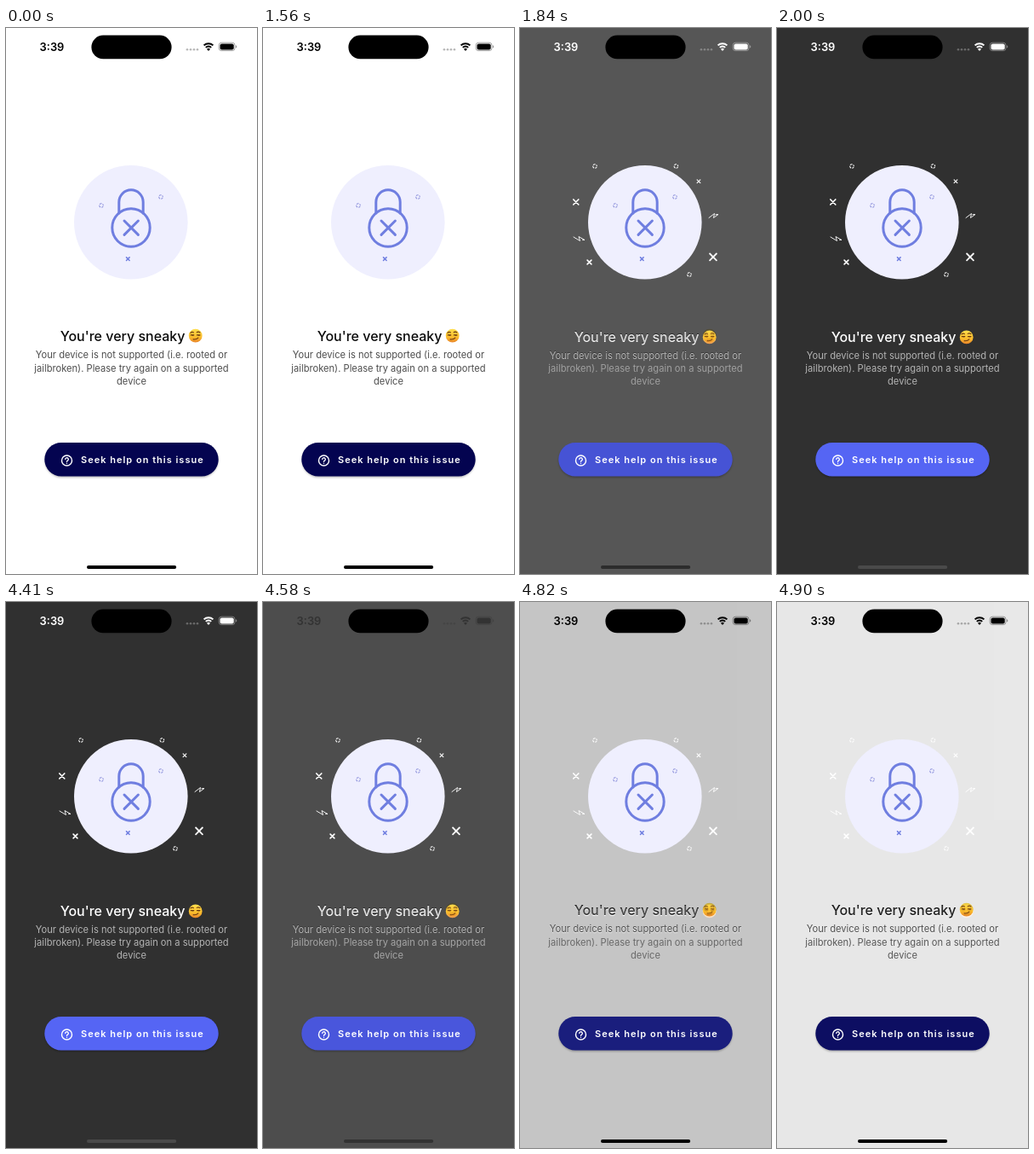
An HTML page that plays this animation: 295x640 px, repeating every 4940 ms.

```html
<!DOCTYPE html>
<html lang="en">
<head>
<meta charset="utf-8">
<style>
html, body { margin: 0; width: 100%; height: 100%; overflow: hidden; background: #fff; }
svg { display: block; width: 100vw; height: 100vh; }
text { font-family: Inter, "Open Sans", sans-serif; }
.title { font-size: 16px; font-weight: 500; }
.body { font-size: 11.15px; text-anchor: middle; }
.btn { font-size: 11px; font-weight: 600; letter-spacing: 1px; fill: #fff; }
.clock { font-size: 12.9px; font-weight: 600; }
.line { fill: none; stroke-linecap: round; stroke-linejoin: round; }
</style>
</head>
<body>
<svg id="stage" viewBox="0 0 295 640"></svg>
<script>
const LOOP = 4940;
const STEPS = [0, 1560, 1630, 1700, 1770, 1840, 1930, 2000, 4410, 4500, 4580, 4660, 4740, 4820, 4900];

const cross = (x, y, r, w, c) =>
  `<path class="line" stroke="${c}" stroke-width="${w}" d="M${x - r} ${y - r}l${2 * r} ${2 * r}m0 ${-2 * r}l${-2 * r} ${2 * r}"/>`;

const spark = (x, y, c) =>
  `<circle cx="${x}" cy="${y}" r="2.3" fill="none" stroke="${c}" stroke-width="1.1" stroke-dasharray="2.6 1.01" stroke-dashoffset="-.5"/>`;

const squiggle = d => `<path class="line" stroke="#fff" stroke-width=".9" d="${d}"/>`;

const lock = () => `
  <circle cx="146.8" cy="227.8" r="66.8" fill="#efeffe"/>
  <g class="line" stroke="#6f7ee0" stroke-width="3">
    <path d="M132.8 217V204a14.2 14.2 0 0 1 28.4 0V217"/>
    <circle cx="147" cy="234" r="22.2"/>
    <path d="M139 226l16.4 16.4m0-16.4l-16.4 16.4"/>
  </g>
  ${cross(143.3, 270.7, 1.8, 1.5, '#6f7ee0')}
  ${spark(112, 208, '#8f93dc')}${spark(182, 198, '#8f93dc')}`;

const smirk = y => `
  <g transform="translate(222.7 ${y})">
    <circle r="7.9" fill="url(#face)"/>
    <g class="line" stroke="#6b3a10" stroke-width="1.1">
      <path d="M-5.8 -3.4q1.8 -1.6 3.6 -.4M1.5 -4q2 -1.3 3.8 .3"/>
      <path d="M-5.5 -.8h3.6M1.7 -.8h3.6M-2.6 4.2q3.8 .5 5.8 -1.8"/>
    </g>
    <path d="M-4.2 -.8h2a1 1 0 0 1-2 0M3 -.8h2a1 1 0 0 1-2 0" fill="#6b3a10"/>
  </g>`;

const LINES = [
  'Your device is not supported (i.e. rooted or',
  'jailbroken). Please try again on a supported',
  'device'
];

function screen(o) {
  const body = LINES.map((s, i) =>
    `<text class="body" x="147.5" y="${o.bodyY + i * o.leading}" fill="${o.body}">${s}</text>`).join('');
  return `
    <rect width="295" height="640" fill="${o.bg}"/>
    ${lock()}
    <text class="title" x="63.7" y="${o.titleY}" fill="${o.title}">You're very sneaky</text>
    ${smirk(o.titleY - 5.8)}
    ${body}
    <rect x="45.5" y="487.4" width="204" height="39.5" rx="19.75" fill="#000" opacity=".25" filter="url(#soft)"/>
    <rect x="45.3" y="486" width="204.4" height="39.4" rx="19.7" fill="${o.button}"/>
    <circle cx="71.5" cy="507" r="6" fill="none" stroke="#fff" stroke-width="1.4"/>
    <path class="line" stroke="#fff" stroke-width="1.3" d="M69.7 505.6a1.8 1.8 0 1 1 2.7 1.5q-.9 .5 -.9 1.2M71.5 510.2v.05"/>
    <text class="btn" x="88" y="510">Seek help on this issue</text>`;
}

const doodles =
  cross(65.8, 204, 3, 1.7, '#fff') + cross(210, 179.8, 1.9, 1.1, '#fff') +
  cross(81.5, 274.5, 2.4, 1.6, '#fff') + cross(227, 268.4, 3.9, 1.8, '#fff') +
  spark(88, 162, '#fff') + spark(183.4, 162, '#fff') + spark(199, 289, '#fff') +
  squiggle('M63 245l7.5 4.5l-1.5 -5l7 4l-2.5 -.2') +
  squiggle('M222 222.5l6.5 -5l-1 5l5.5 -4l-3 .2');

const status = `
  <text class="clock" x="39.6" y="26.7">3:39</text>
  <g opacity=".28">${[213, 217, 221, 225].map(x => `<circle cx="${x}" cy="25.2" r="1.3"/>`).join('')}</g>
  <g fill="none" stroke="currentColor" stroke-width="2">
    <path d="M232.6 20.4a7.7 7.7 0 0 1 10.8 0M234.8 22.9a4.6 4.6 0 0 1 6.4 0"/>
  </g>
  <path d="M238 27l-2 -2.2a2.9 2.9 0 0 1 4 0z"/>
  <rect x="250.2" y="17.2" width="18.8" height="9.4" rx="3" fill="none" stroke="currentColor" stroke-opacity=".4" stroke-width=".9"/>
  <rect x="251.5" y="18.4" width="16.2" height="7" rx="2"/>
  <path d="M270.1 20.3q1.2 .4 1.2 1.6t-1.2 1.6z" opacity=".45"/>`;

const stage = document.getElementById('stage');
stage.innerHTML = `
  <defs>
    <linearGradient id="face" x2="0" y2="1">
      <stop stop-color="#ffdf4d"/><stop offset=".6" stop-color="#fbbd2c"/><stop offset="1" stop-color="#e8842a"/>
    </linearGradient>
    <filter id="soft" x="-10%" y="-30%" width="120%" height="160%"><feGaussianBlur stdDeviation="1.1"/></filter>
  </defs>
  ${screen({ bg: '#fff', title: '#0b0b0b', titleY: 366.5, body: '#4d4d4d', bodyY: 386.7, leading: 15.8, button: '#040450' })}
  <g id="dark">${screen({ bg: '#303030', title: '#fff', titleY: 368.2, body: '#b4b4b4', bodyY: 388, leading: 14.9, button: '#5565f4' })}${doodles}</g>
  <rect x="100.4" y="8.6" width="94.2" height="27.6" rx="13.8"/>
  <g id="status">${status}</g>
  <rect id="home" x="95" y="630" width="105.2" height="4" rx="2"/>`;

const [dark, bar, home] = ['dark', 'status', 'home'].map(id => document.getElementById(id));

function ramp(t, start, length) {
  const u = Math.min(1, Math.max(0, (t - start) / length));
  return u * u * (3 - 2 * u);
}
const gray = v => `rgb(${[v, v, v].map(Math.round)})`;

function draw(time) {
  const t = STEPS.filter(s => s <= time % LOOP).pop();
  const p = ramp(t, 1550, 400) - ramp(t, 4440, 580);
  const ink = gray(255 * (ramp(t, 1550, 250) - ramp(t, 4430, 210)));
  dark.setAttribute('opacity', p);
  bar.setAttribute('fill', ink);
  bar.setAttribute('color', ink);
  home.setAttribute('fill', gray(74 * p ** 2.5));
}

const begin = performance.now();
function tick() {
  draw(performance.now() - begin);
  requestAnimationFrame(tick);
}
tick();
</script>
</body>
</html>
```
